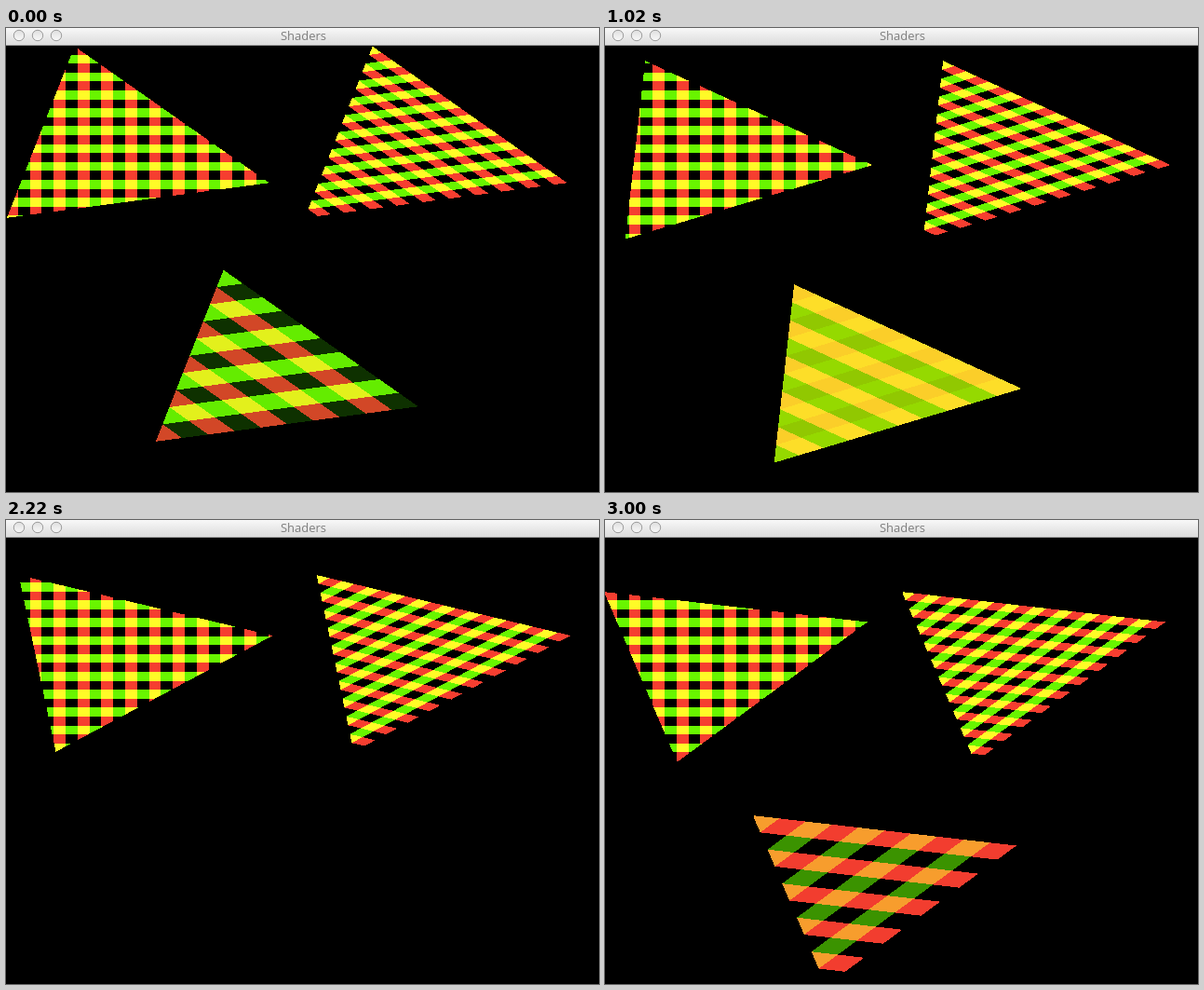
Recreate the animation shown at these times as an HTML page with a canvas. Size 637x498 px, loop 3.1 s.

```html
<!DOCTYPE html>
<html lang="en">
<head>
<meta charset="utf-8">
<title>Shaders</title>
<style>
  html, body { margin: 0; width: 637px; height: 498px; overflow: hidden; background: #000; }
  canvas { display: block; }
</style>
</head>
<body>
<canvas id="stage" width="637" height="498"></canvas>
<script>
const ctx = document.getElementById('stage').getContext('2d');
const W = 637, BAR = 19, H = 498 - BAR;
const VIEW_W = 320, VIEW_H = 240, SIZE = 0.8;
const STEP = 60, LAST = 50, LOOP = 3100;

const image = ctx.createImageData(W, H);
const pixels = new Uint32Array(image.data.buffer);

// Display colour of a red/green pair, mixed in linear light
const toLinear = v => v <= 0.04045 ? v / 12.92 : ((v + 0.055) / 1.055) ** 2.4;
const toByte = v => {
  v = Math.min(1, Math.max(0, v));
  return Math.round(255 * (v <= 0.0031308 ? v * 12.92 : 1.055 * v ** (1 / 2.4) - 0.055));
};
function color(r, g) {
  const a = toLinear(r), b = toLinear(g);
  const red = toByte(0.92 * a + 0.138 * b);
  const green = toByte(0.048 * a + 0.913 * b);
  const blue = toByte(0.03 * a - 0.01 * b);
  return (255 << 24 | blue << 16 | green << 8 | red) >>> 0;
}
const BLACK = color(0, 0);

// Colours indexed by (odd red stripe) + 2 * (odd green stripe)
const palette = (r, g) => [color(r[0], g[0]), color(r[1], g[0]), color(r[0], g[1]), color(r[1], g[1])];
const pick = (colors, i, j) => colors[(i & 1) + 2 * (j & 1)];
const CHECKS = palette([1, 0], [0, 1]);
const WEAVE = palette([1, 0], [1, 0]);

const wave = (k, speed, peak) => Math.max(0, Math.cos(speed * (k - peak)));

function drawTriangle(left, top, angle, shade) {
  const c = Math.cos(angle), s = Math.sin(angle);
  for (let y = 0; y < VIEW_H && top + y < H; y++) {
    const ny = (y + 0.5) / (VIEW_H / 2) - 1;
    for (let x = 0; x < VIEW_W && left + x < W; x++) {
      const nx = (x + 0.5) / (VIEW_W / 2) - 1;
      const px = (c * nx + s * ny) / SIZE, py = (c * ny - s * nx) / SIZE;
      const wb = (px + 1) / 2;
      const wa = (1 - wb - py) / 2, wc = (1 - wb + py) / 2;
      if (wa < 0 || wb < 0 || wc < 0) continue;
      pixels[(top + y) * W + left + x] = shade(x + 0.5, y + 0.5, wc, 1 - wa);
    }
  }
}

function drawScene(k) {
  const angle = 0.012 * (24 - k);
  const pulse = palette(
    [wave(k, 0.19, 16), wave(k, 0.2756, 20.8)],
    [wave(k, 0.39, 15.4), wave(k, 0.26, 18.9)]
  );
  pixels.fill(BLACK);
  drawTriangle(0, 0, angle, (x, y) => pick(CHECKS, x / 12.8, y / 9.6));
  drawTriangle(320, 0, angle, (x, y, u, v) => pick(WEAVE, u * 20, v * 20));
  drawTriangle(160, 240, angle, (x, y, u, v) => pick(pulse, u * 10, v * 10));
  ctx.putImageData(image, 0, BAR);
}

function drawBar() {
  const shine = ctx.createLinearGradient(0, 0, 0, 18);
  shine.addColorStop(0, '#f8f8f8');
  shine.addColorStop(1, '#dcdcdc');
  ctx.fillStyle = shine;
  ctx.fillRect(0, 0, W, 18);
  ctx.fillStyle = '#a2a2a2';
  ctx.fillRect(0, 18, W, 1);

  ctx.lineWidth = 1;
  ctx.strokeStyle = '#9c9c9c';
  for (const x of [14, 34, 54]) {
    const glass = ctx.createLinearGradient(0, 2, 0, 14);
    glass.addColorStop(0, '#dedede');
    glass.addColorStop(1, '#fafafa');
    ctx.fillStyle = glass;
    ctx.beginPath();
    ctx.arc(x, 8, 5.7, 0, Math.PI * 2);
    ctx.fill();
    ctx.stroke();
  }

  ctx.fillStyle = '#7d7d7d';
  ctx.font = '13px "Open Sans", "Noto Sans", sans-serif';
  ctx.textAlign = 'center';
  ctx.fillText('Shaders', 319.5, 13);
}

let shown = -1;
function tick(now) {
  const k = Math.min(LAST, Math.floor((now - start) % LOOP / STEP));
  if (k !== shown && k >= 0) drawScene(shown = k);
  requestAnimationFrame(tick);
}

drawBar();
drawScene(0);
const start = performance.now();
requestAnimationFrame(tick);
</script>
</body>
</html>
```
